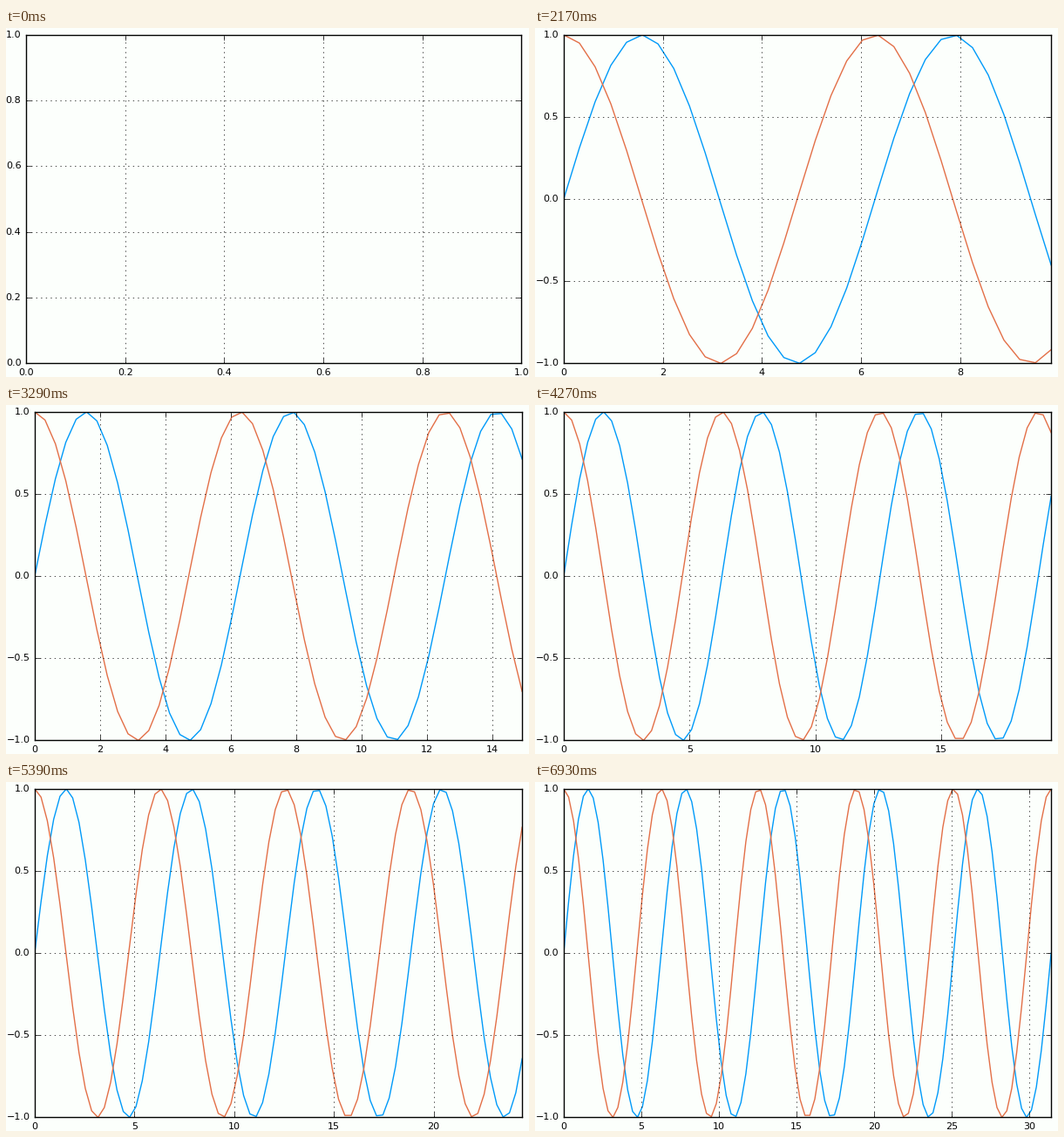
A matplotlib script for the animation above (7 s loop, 600 by 400 pixels).

```python
import math

import numpy as np
import matplotlib.pyplot as plt
from matplotlib.animation import FuncAnimation

WIDTH, HEIGHT, DPI = 600, 400, 100
STEPS, INTERVAL = 100, 70
TOP, BOTTOM = 7.87, 384.4
PAPER = "#fcfffc"

plt.rcParams.update({
    "font.family": "DejaVu Sans",
    "font.size": 8,
    "axes.linewidth": 1.0,
    "axes.axisbelow": False,
    "axes.unicode_minus": True,
    "lines.scale_dashes": False,
    "ytick.alignment": "center",
})
for side in ("xtick", "ytick"):
    plt.rcParams.update({
        f"{side}.direction": "in",
        f"{side}.labelsize": 8,
        f"{side}.major.size": 4,
        f"{side}.major.width": 0.5,
        f"{side}.major.pad": 4,
    })
plt.rcParams.update({"xtick.top": True, "ytick.right": True})

xs = np.linspace(0, 10 * np.pi, STEPS)
sines, cosines = np.sin(xs), np.cos(xs)

fig = plt.figure(figsize=(WIDTH / DPI, HEIGHT / DPI), dpi=DPI, facecolor=PAPER)
ax = fig.add_axes([0.1, 0.1, 0.8, 0.8], facecolor=PAPER)
ax.grid(True, color="black", linewidth=0.5, linestyle=(0, (1, 3)))
sin_line, = ax.plot([], [], color=(0.0, 0.605, 0.978), linewidth=1)
cos_line, = ax.plot([], [], color=(0.889, 0.4356, 0.278), linewidth=1)


def tick_step(lo, hi, bins=9):
    """Smallest step of 1, 2, 5 or 10 that covers the range in the given bins."""
    raw = (hi - lo) / bins
    scale = 10 ** math.floor(math.log10(raw))
    for base in (1, 2, 5, 10):
        step = base * scale
        reach = math.floor(lo / step) * step + bins * step
        if step >= raw and reach >= hi - 1e-9:
            break
    return step


def ticks(lo, hi, pixels):
    """Tick places and labels; ticks up to half a pixel outside still count."""
    step = tick_step(lo, hi)
    slack = 0.5 * (hi - lo) / pixels
    first = math.ceil((lo - slack) / step)
    last = math.floor((hi + slack) / step)
    values = [n * step for n in range(first, last + 1)]
    digits = max(0, -math.floor(math.log10(step)))
    labels = [f"{v:.{digits}f}".replace("-", "\u2212") for v in values]
    return np.clip(values, lo, hi), labels


def update(i):
    shown = slice(0, i + 1 if i else 0)
    sin_line.set_data(xs[shown], sines[shown])
    cos_line.set_data(xs[shown], cosines[shown])

    x_max = xs[i] if i else 1.0
    y_min = min(0.0, sines[:i + 1].min(), cosines[:i + 1].min())

    y_places, y_labels = ticks(y_min, 1.0, BOTTOM - TOP)
    # The margins make room for minus signs and for a label on the right edge.
    left = 32.9 if y_labels[0].startswith("\u2212") else 23.0
    right = 592.13 if i else 591.3
    x_places, x_labels = ticks(0.0, x_max, right - left)

    ax.set_position([left / WIDTH, 1 - BOTTOM / HEIGHT,
                     (right - left) / WIDTH, (BOTTOM - TOP) / HEIGHT])
    ax.set_xticks(x_places, x_labels)
    ax.set_yticks(y_places, y_labels)
    ax.set_xlim(0, x_max)
    ax.set_ylim(y_min, 1)
    return sin_line, cos_line


anim = FuncAnimation(fig, update, frames=STEPS, interval=INTERVAL,
                     repeat=True, repeat_delay=0, blit=False)
plt.show()
```
